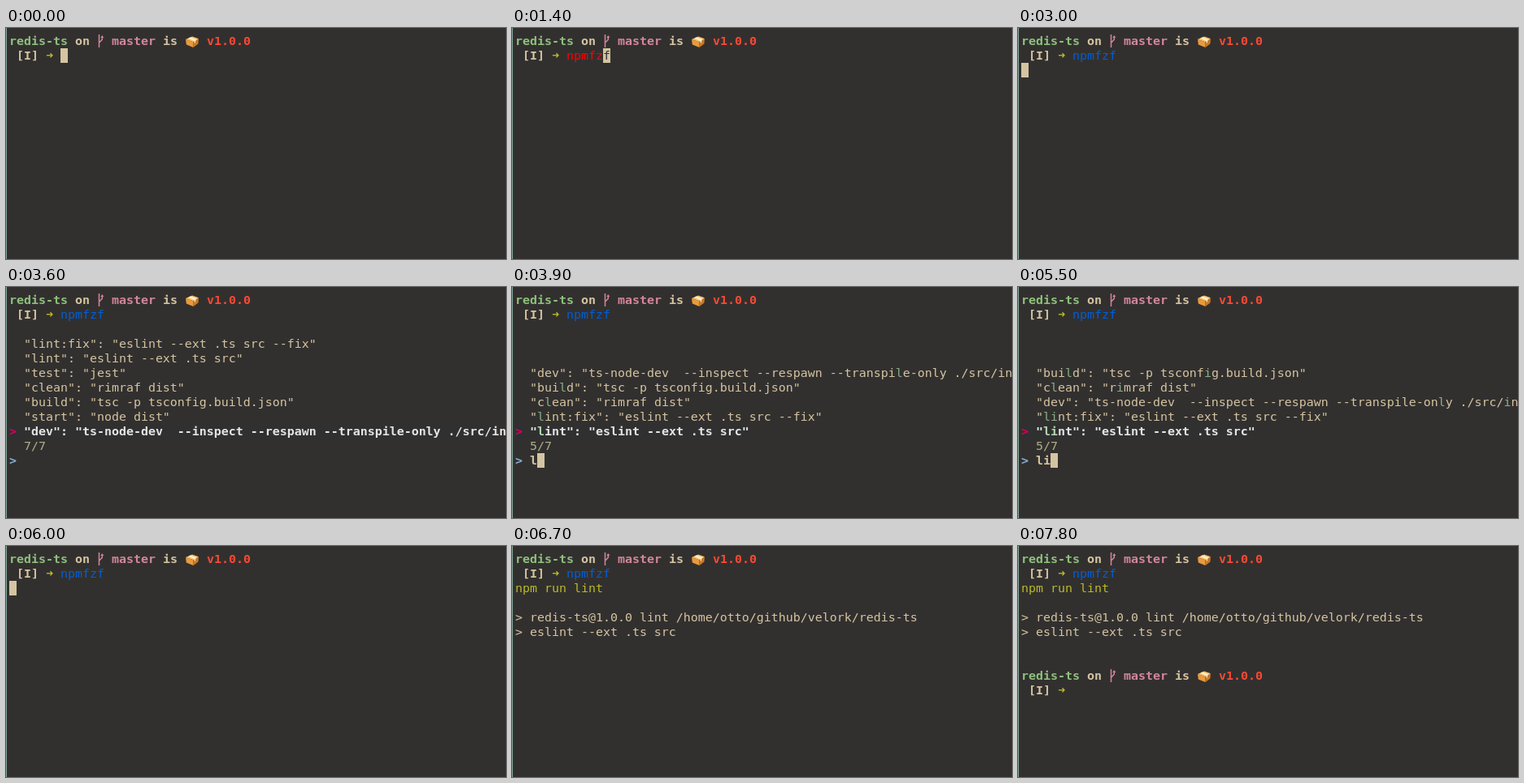
These frames come from a looping animation (615 by 285 pixels, 8 s). An HTML page:

```html
<!DOCTYPE html>
<html lang="en">
<head>
<meta charset="utf-8">
<title>Terminal</title>
<style>
  html, body { margin: 0; width: 100%; height: 100%; overflow: hidden; background: #32302f; }
  #term {
    position: relative; width: 615px; height: 285px; overflow: hidden;
    box-sizing: border-box; background: #32302f; color: #d5c4a1;
    font: 14.95px/18px "DejaVu Sans Mono", "DejaVu Sans", monospace;
    font-variant-ligatures: none;
  }
  #term::before { content: ""; position: absolute; left: 0; top: 0; width: 1px; height: 285px; background: #83a598; }
  #term > span, #term > svg { position: absolute; white-space: pre; height: 18px; }
  .bold { font-weight: bold; }
  .dir { color: #8ec07c; }
  .git { color: #d3869b; }
  .ver { color: #fb4934; }
  .ok { color: #b8bb26; }
  .bad { color: #f00; }
  .cmd { color: #005fd7; }
  .hint { color: #555; }
  .cursor { width: 9px; background: #d5c4a1; color: #32302f; }
  .hit { color: #87af87; }
  .now { color: #e4e4e4; background: #303030; font-weight: bold; }
  .now .hit { color: #afd7af; }
  .mark { color: #d7005f; background: #303030; font-weight: bold; }
  .count { color: #afaf87; }
  .ask { color: #87afd7; font-weight: bold; }
</style>
</head>
<body>
<div id="term"></div>
<script>
const term = document.getElementById('term');

const place = (col, row) => `style="left:${4 + 9 * col}px;top:${7 + 18 * row}px"`;
const put = (col, row, text, cls = '') => `<span class="${cls}" ${place(col, row)}>${text}</span>`;
const cursor = (col, row, char = '') => put(col, row, char, 'cursor');

const branch = row => `<svg width="9" height="18" ${place(12, row)}>
  <path d="M2.5 1V17M6.3 4V7.2L2.5 11.2" fill="none" stroke="#d3869b" stroke-width="1.5"/>
  <path d="M4.3 5L6.3 2L8.3 5Z" fill="#d3869b"/></svg>`;

const parcel = row => `<svg width="18" height="18" ${place(24, row)}>
  <path d="M1 7L9 3.4L17 6.2L10.5 10.2Z" fill="#fbc56d"/>
  <path d="M1 7L10.5 10.2V17L1.8 13.4Z" fill="#e99a3c"/>
  <path d="M17 6.2L10.5 10.2V17L16.4 12.6Z" fill="#c97a28"/>
  <path d="M4.4 5.5L6.6 4.5L15 7.5L13 8.7V11L11.8 11.8V9.3Z" fill="#fff0cf"/></svg>`;

const prompt = row =>
  put(0, row, 'redis-ts', 'bold dir') + put(9, row, 'on', 'bold') + branch(row) +
  put(14, row, 'master', 'bold git') + put(21, row, 'is', 'bold') + parcel(row) +
  put(27, row, 'v1.0.0', 'bold ver') +
  put(1, row + 1, '[I]', 'bold') + put(5, row + 1, '➜', 'bold ok');

// Command line with n letters typed and the rest suggested
const word = 'npmfzf';
const typed = (n, cls, hint = true) =>
  prompt(0) + put(7, 1, word.slice(0, n), cls) +
  (hint ? put(7 + n, 1, word.slice(n), 'hint') : '') +
  cursor(7 + n, 1, hint ? word[n] || '' : '');

const entered = prompt(0) + put(7, 1, word, 'cmd');

// Picker list ends on row 9; braces mark matched letters
const picker = (query, list) => {
  const first = 10 - list.length;
  const lines = list.map((line, i) => put(2, first + i,
    line.replace(/\{(.)\}/g, '<span class="hit">$1</span>'),
    first + i === 9 ? 'now' : '')).join('');
  return entered + lines + put(0, 9, '> ', 'mark') +
    put(2, 10, list.length + '/7', 'count') +
    put(0, 11, '&gt;', 'ask') + put(2, 11, query, 'bold');
};

const all = picker('', [
  '"lint:fix": "eslint --ext .ts src --fix"',
  '"lint": "eslint --ext .ts src"',
  '"test": "jest"',
  '"clean": "rimraf dist"',
  '"build": "tsc -p tsconfig.build.json"',
  '"start": "node dist"',
  '"dev": "ts-node-dev  --inspect --respawn --transpile-only ./src/index.ts"'
]);
const one = picker('l', [
  '"dev": "ts-node-dev  --inspect --respawn --transpi{l}e-only ./src/index.ts"',
  '"bui{l}d": "tsc -p tsconfig.build.json"',
  '"c{l}ean": "rimraf dist"',
  '"{l}int:fix": "eslint --ext .ts src --fix"',
  '"{l}int": "eslint --ext .ts src"'
]);
const two = picker('li', [
  '"bui{l}d": "tsc -p tsconf{i}g.build.json"',
  '"c{l}ean": "r{i}mraf dist"',
  '"dev": "ts-node-dev  --inspect --respawn --transpile-on{l}y ./src/{i}ndex.ts"',
  '"{l}{i}nt:fix": "eslint --ext .ts src --fix"',
  '"{l}{i}nt": "eslint --ext .ts src"'
]);

const run = entered + put(0, 2, 'npm run lint', 'ok');
const output = run +
  put(0, 4, '&gt; redis-ts@1.0.0 lint /home/otto/github/velork/redis-ts') +
  put(0, 5, '&gt; eslint --ext .ts src');

const steps = [
  [0, typed(0, '', false)],
  [300, typed(1, 'bad', false)],
  [400, typed(1, 'bad')],
  [600, typed(2, 'bad')],
  [900, typed(3, 'cmd')],
  [1200, typed(4, 'bad')],
  [1400, typed(5, 'bad')],
  [1700, typed(6, 'cmd')],
  [2400, entered],
  [2900, typed(6, 'cmd')],
  [3000, entered + cursor(0, 2)],
  [3100, all + cursor(2, 11)],
  [3600, all],
  [3900, one + cursor(3, 11)],
  [4400, two + cursor(4, 11)],
  [5100, two],
  [5500, two + cursor(4, 11)],
  [6000, entered + cursor(0, 2)],
  [6100, run + cursor(0, 3)],
  [6200, output + cursor(0, 7)],
  [6700, output],
  [7100, output + cursor(0, 7)],
  [7700, output],
  [7800, output + prompt(8)]
];

const start = performance.now();
let shown = -1;
function draw() {
  const t = (performance.now() - start) % 8000;
  const i = steps.findLastIndex(([at]) => at <= t);
  if (i !== shown) {
    term.innerHTML = steps[i][1];
    shown = i;
  }
  requestAnimationFrame(draw);
}
draw();
</script>
</body>
</html>
```
